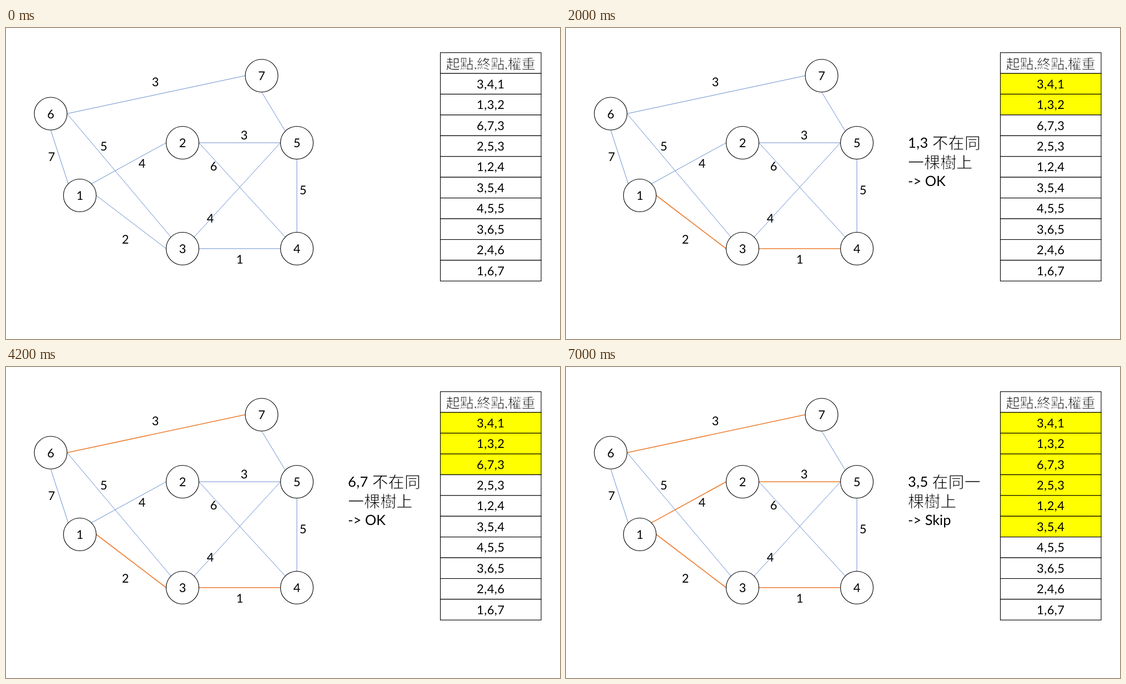
An HTML page for the animation above (8 s loop, 998 by 561 pixels).

```html
<!DOCTYPE html>
<html lang="zh-Hant">
<head>
<meta charset="utf-8">
<style>
html, body { margin: 0; width: 100%; height: 100%; overflow: hidden; background: #fff; }
svg { display: block; width: 100%; height: 100%; }
text { font: 21.8px Lato, "Noto Sans CJK TC", "Noto Sans CJK", sans-serif; text-rendering: geometricPrecision; }
.mid { text-anchor: middle; }
.row { letter-spacing: .5px; }
.note { font-size: 25.4px; }
/* a white outline thins the heavy CJK strokes */
.head, .han { stroke: #fff; stroke-width: .8; }
.head { font-size: 24.95px; }
.han { font-size: 29.1px; }
.edge { stroke: #4472c4; stroke-width: .8; }
.edge.on { stroke: #ed7d31; stroke-width: 1.6; }
.node, .cell { fill: #fff; stroke: #000; stroke-width: 1.1; }
.cell.on { fill: #ff0; }
</style>
</head>
<body>
<svg id="stage" viewBox="0 0 998 561"></svg>
<script>
const stage = document.getElementById('stage');
const R = 29.5, ROW = 37.45, LEFT = 782.5, TOP = 44.5, WIDTH = 181.5;
const compass = ['E', 'SE', 'S', 'SW', 'W', 'NW', 'N', 'NE'];
const nodes = {
  1: [133, 302], 2: [318, 207], 3: [318, 398], 4: [524, 398],
  5: [524, 207], 6: [80.5, 154.5], 7: [460.5, 86]
};
// both ends (node and side), weight, label centre; sorted by weight
const edges = [
  ['3E', '4W', 1, 421, 417],
  ['1E', '3W', 2, 215, 381],
  ['6E', '7W', 3, 269, 97],
  ['2E', '5W', 3, 429, 193],
  ['1NE', '2W', 4, 245, 244],
  ['3NE', '5W', 4, 368, 343],
  ['4N', '5S', 5, 535, 292],
  ['3NW', '6E', 5, 176, 213],
  ['2E', '4NW', 6, 374, 249],
  ['1NW', '6S', 7, 82, 232]
];

function add(tag, attrs, text = '') {
  const el = document.createElementNS('http://www.w3.org/2000/svg', tag);
  for (const key in attrs) el.setAttribute(key, attrs[key]);
  el.textContent = text;
  return stage.appendChild(el);
}
const label = (x, y, text, cls = '') => add('text', { x, y: y + 8, class: 'mid ' + cls }, text);
const cell = i => add('rect', { x: LEFT, y: TOP + i * ROW, width: WIDTH, height: ROW, class: 'cell' });
const pairOf = ([a, b]) => a[0] + ',' + b[0];

function port(end) {
  const a = compass.indexOf(end.slice(1)) * Math.PI / 4, [x, y] = nodes[end[0]];
  return [x + R * Math.cos(a), y + R * Math.sin(a)];
}
function link([a, b]) {
  const [x1, y1] = port(a), [x2, y2] = port(b);
  return add('line', { x1, y1, x2, y2, class: 'edge' });
}

link(['7S', '5NW']);
const lines = edges.map(link);
for (const id in nodes) {
  const [cx, cy] = nodes[id];
  add('circle', { cx, cy, r: R, class: 'node' });
  label(cx, cy, id);
}

const centre = LEFT + WIDTH / 2;
cell(0);
label(centre, 65.5, '起點,終點,權重', 'head');
const cells = edges.map((e, i) => cell(i + 1));
edges.forEach((e, i) => {
  const [, , weight, x, y] = e;
  label(x, y, weight);
  label(centre, TOP + (i + 1.5) * ROW, pairOf(e) + ',' + weight, 'row');
});

const note = [
  add('text', { x: 616, y: 216, class: 'note row' }),
  add('text', { x: 659.5, y: 217.5, class: 'han' }),
  add('text', { x: 616, y: 252.5, class: 'han' }),
  add('text', { x: 616, y: 285, class: 'note' })
];

// Kruskal: an edge is skipped when its ends already share a tree
const tree = {};
for (const id in nodes) tree[id] = id;
const accepted = edges.map(([a, b]) => {
  const from = tree[a[0]], to = tree[b[0]];
  for (const id in tree) if (tree[id] === from) tree[id] = to;
  return from !== to;
});

let shown = -1;
function show(step) {
  cells.forEach((c, i) => c.classList.toggle('on', i < step));
  lines.forEach((l, i) => l.classList.toggle('on', i < step && accepted[i]));
  const verdict = accepted[step - 1] ? ['不在同', '一棵樹上', '-> OK'] : ['在同一', '棵樹上', '-> Skip'];
  const words = step ? [pairOf(edges[step - 1]), ...verdict] : [];
  note.forEach((el, i) => el.textContent = words[i] || '');
  shown = step;
}
const start = performance.now();
function tick() {
  const second = Math.floor((performance.now() - start) % 8000 / 1000);
  const step = second < 4 ? second : second - 1; // the third step lasts two seconds
  if (step !== shown) show(step);
  requestAnimationFrame(tick);
}
tick();
</script>
</body>
</html>
```
